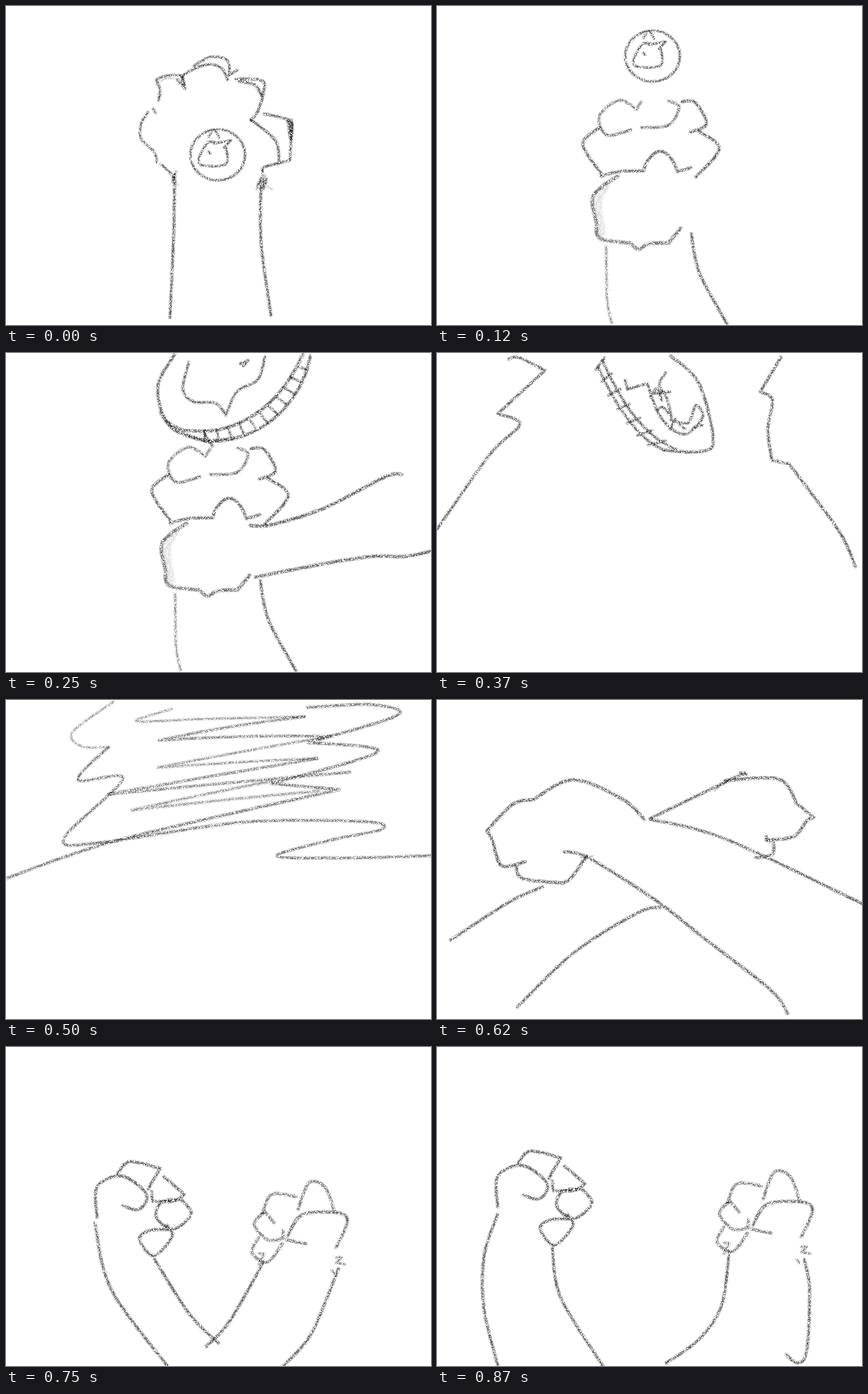
Write an HTML page with a canvas that moves like this. It is 560 px wide and 420 px high and loops after 1 s.

```html
<!DOCTYPE html>
<html lang="en">
<head>
<meta charset="utf-8">
<title>Pencil loop</title>
<style>
html, body { margin: 0; width: 560px; height: 420px; overflow: hidden; background: #fff; }
canvas { display: block; }
</style>
</head>
<body>
<canvas id="stage" width="560" height="420"></canvas>
<script>
const W = 560, H = 420, LOOP = 1000;
let ctx, grain, rnd;

function seeded(seed) {
  return () => {
    seed = (seed + 0x6D2B79F5) | 0;
    let v = Math.imul(seed ^ (seed >>> 15), 1 | seed);
    v = (v + Math.imul(v ^ (v >>> 7), 61 | v)) ^ v;
    return ((v ^ (v >>> 14)) >>> 0) / 4294967296;
  };
}

function newSheet(w, h) {
  const sheet = document.createElement('canvas');
  sheet.width = w;
  sheet.height = h;
  return sheet;
}

// Paper tooth: a tile of random ink strengths used as stroke paint.
function makeGrain(size) {
  const tile = newSheet(size, size), c = tile.getContext('2d'), r = seeded(5);
  c.fillStyle = '#262626';
  for (let i = 0; i < size * size; i++) {
    const v = r();
    if (v < .22) continue;
    c.globalAlpha = .1 + .75 * v;
    c.fillRect(i % size, Math.floor(i / size), 1, 1);
  }
  return tile;
}

// A light wide pass and a darker core.
function mark(path, width = 3.8, ink = 1) {
  for (const [grow, alpha] of [[1.3, .5], [-1, .8]]) {
    ctx.lineWidth = width + grow;
    ctx.globalAlpha = Math.min(1, alpha * ink);
    ctx.stroke(path);
  }
}

// "x,y x,y" is a smooth run, "/" a sharp corner, "|" lifts the pencil.
function line(text, width, ink) {
  for (const stroke of text.split('|')) {
    const path = new Path2D();
    let last = null;
    for (const run of stroke.split('/')) {
      const p = run.trim().split(/\s+/).map(q => q.split(',').map(Number));
      if (last) p.unshift(last);
      else path.moveTo(...p[0]);
      last = p[p.length - 1];
      for (let i = 0; i < p.length - 1; i++) {
        const b = p[i], c = p[i + 1], a = p[i - 1] || b, d = p[i + 2] || c;
        path.bezierCurveTo(
          b[0] + (c[0] - a[0]) / 6, b[1] + (c[1] - a[1]) / 6,
          c[0] - (d[0] - b[0]) / 6, c[1] - (d[1] - b[1]) / 6, ...c);
      }
    }
    mark(path, width, ink);
  }
}

// Back and forth between turning points, each stroke lifted by the bow.
function zigzag(text, bow, width, ink) {
  const p = text.split(' ').map(q => q.split(',').map(Number)), path = new Path2D();
  path.moveTo(...p[0]);
  for (let i = 1; i < p.length; i++)
    path.quadraticCurveTo((p[i - 1][0] + p[i][0]) / 2, (p[i - 1][1] + p[i][1]) / 2 - bow, ...p[i]);
  mark(path, width, ink);
}

function oval(x, y, rx, ry, width, ink) {
  const path = new Path2D();
  path.ellipse(x, y, rx, ry, 0, 0, Math.PI * 2);
  mark(path, width, ink);
}

function segment(a, b, width, ink) {
  const path = new Path2D();
  path.moveTo(...a);
  path.lineTo(...b);
  mark(path, width, ink);
}

function hatch(x, y, w, h, n) {
  for (let i = 0; i < n; i++) {
    const px = x + (rnd() - .5) * w, py = y + (rnd() - .5) * h;
    segment([px - 2, py + 5], [px + 2, py - 5], 3, .6);
  }
}

function cubic(c, u) {
  const v = 1 - u;
  return [0, 1].map(k => v * v * v * c[k] + 3 * v * v * u * c[2 + k] + 3 * v * u * u * c[4 + k] + u * u * u * c[6 + k]);
}

// Two curved rails with evenly spaced cross ticks.
function rails(outer, inner, ticks, over, width) {
  for (const c of [outer, inner]) mark(new Path2D(`M${c[0]} ${c[1]}C${c.slice(2)}`), width);
  for (let i = 0; i < ticks; i++) {
    const u = i / ticks, a = cubic(outer, u), b = cubic(inner, u);
    const dx = (b[0] - a[0]) * over, dy = (b[1] - a[1]) * over;
    segment([a[0] - dx, a[1] - dy], [b[0] + dx, b[1] + dy], 3.2, .9);
  }
}

function moved(dx, dy, draw) {
  ctx.save();
  ctx.translate(dx, dy);
  draw();
  ctx.restore();
}

function coin() {
  oval(279, 196, 36, 33.5, 3.2);
  line('267,172 274,163 281,173|275,181 296,177/287,187|276,180 266,180 254,201 260,210 290,208 290,187', 3);
  segment([267, 192], [269, 194], 3);
}

function raisedPaw() {
  line('222,224 221,300 216,410|336,240 336,310 349,407');
  line('187,140 178,155 178,175 195,192 199,206|204,208 221,224|194,135 197,141', 3.2);
  line('201,124 203,110 198,97/210,92 231,92 236,109/226,98', 3.2);
  line('234,106/234,91 265,77 284,82 292,97|247,79 270,67 292,72 294,91/305,84', 3.4);
  line('303,96 337,98 339,115 331,140 323,150|307,99 328,104 337,118', 3.6);
  line('323,150 355,177 360,206|340,142 370,149 377,156/374,203/341,212 338,219', 3.6);
  line('198,103 212,95 231,97|220,224 226,236|340,236 350,241', 3, .3);
  line('372,151 375,174|376,151 376,172', 4.5);
  hatch(336, 233, 12, 16, 9);
  hatch(221, 225, 4, 6, 3);
  coin();
}

function fist() {
  line('269,126 263,136/240,124 214,145 224,170 255,163|305,125 319,133 305,157 270,160', 3.6, .85);
  line('323,126 340,127 355,155 334,166|345,165 372,188 341,225', 3.8);
  line('214,160 192,182 216,220|216,224 240,218 272,217/278,203 293,191 308,200 317,218/334,213', 3.8);
  line('238,224 206,250 210,285 215,306 255,312/265,320 280,313 305,312/321,293', 4.6, .85);
  line('222,236 212,258 217,300', 11, .16);
  line('223,316 224,385 230,417', 3.4, .65);
  line('335,300 346,352 382,418');
}

function bigCoin() {
  rails([262, 116, 330, 120, 388, 72, 401, 4], [262, 103, 320, 100, 365, 60, 391, 2], 11, 0, 4);
  line('222,2 200,45 215,95 262,116');
  line('203,78 222,101 262,115 300,112', 4.2, .7);
  line('212,90 232,101 262,103|262,108 272,122');
  line('241,12 233,48 247,64 276,66 290,82/304,51 332,35 341,5', 3.4);
  line('309,14 319,10/313,17', 3.4);
}

function sideArm() {
  line('322,227 350,226 420,204 500,163 521,160|329,295 400,281 480,268 525,268 560,261', 4.2);
}

function shoulders() {
  line('94,8 108,6 142,23/80,80/109,94 70,133 0,232', 3.6);
  line('453,6 426,51/442,62 436,100 441,141/464,146/530,235 551,281');
  rails([212, 18, 228, 55, 262, 115, 300, 128], [218, 10, 238, 55, 268, 108, 315, 127], 7, .45, 3.4);
  line('300,128 345,130 364,115 345,40 308,4');
}

function mouth() {
  line('248,36 251,48/277,40/295,85 325,107 350,85 341,69 331,92 308,88', 3.4);
  line('301,26 293,42 303,60 309,85|281,58 290,47 296,62|287,53 307,51', 3.4);
  line('291,75 297,71 305,79|307,100 314,87|320,95 327,100|338,98 350,95', 3);
}

function scribble() {
  line('142,2 88,42 100,61 135,62', 3.2, .55);
  line('135,62 95,105 154,104 76,183 130,187 310,161 470,160 496,170 430,184 357,205 440,208 560,205', 3.6, .85);
  line('218,12 172,28 260,25 393,22', 3.2, .6);
  zigzag('393,22 202,53 427,48', 5, 3.6, .75);
  zigzag('427,48 200,89 410,77', 2, 3.4, .6);
  zigzag('410,77 135,124 453,95', 1, 3.8, .7);
  zigzag('350,107 166,145 412,120', 2, 3.6, .6);
  line('397,10 480,6 516,20 398,56/490,68 350,110/439,118/150,184 0,235', 3.8, .85);
}

function crossedArms() {
  line('273,157 245,131 180,105 127,131/100,137 66,172/73,185 85,218 116,213', 4.2);
  line('104,217 113,235 166,241/177,234 197,206', 4.2);
  line('168,200 200,208 290,265 350,312 440,382 462,413', 4);
  line('106,404 180,333 265,280 294,273|18,316 95,266 139,246', 3.8);
  line('281,157 380,183 560,268|281,156 405,96', 3.8);
  line('400,96 407,98|434,180 437,187', 4);
  line('380,106 450,104 474,136/497,155/488,158 470,180 434,184|443,185 442,203 420,208', 4);
  line('366,119 382,106|190,207 205,206', 3, .4);
}

function leftPaw() {
  line('80,210 80,170 113,156 145,180 135,200 114,195|107,153 123,137 163,146/147,173');
  line('168,157 195,180/180,189 153,189/152,176|192,188 204,206 180,226 158,210 165,190 190,187');
  line('172,221 179,235 155,261 136,240 148,228 177,226');
}

function rightPaw() {
  line('383,205 395,180 427,183|386,203 398,217|430,200 444,165 465,170 478,203', 4, .8);
  line('416,235 435,207 480,204 495,215 480,250|415,240 440,245', 4, .9);
  line('383,205 372,220 390,240 410,238/410,228|378,237 369,257 390,269 409,245', 4, .8);
  line('378,258 385,258/378,272|480,263 487,263/480,270/492,272|474,280 477,284', 3, .8);
}

function openArms() {
  line('80,220 62,275 62,345 80,419|152,265 163,330 218,419');
  line('385,270 375,340 345,385 302,416|484,280 491,320 487,400 475,416 460,405');
}

function swingArms() {
  line('117,232 139,320 212,419|196,280 242,352 280,390');
  line('339,284 294,362 264,394|438,292 402,378 366,419');
}

const scenes = [
  [0, raisedPaw],
  [120, () => { moved(5, -130, coin); fist(); }],
  [250, () => { bigCoin(); fist(); sideArm(); }],
  [370, () => { shoulders(); mouth(); }],
  [500, scribble],
  [620, crossedArms],
  [750, () => { moved(40, 14, leftPaw); moved(-45, 14, rightPaw); swingArms(); }],
  [870, () => { leftPaw(); rightPaw(); openArms(); }]
];

const tile = makeGrain(256);
const sheets = scenes.map(([, draw], i) => {
  const sheet = newSheet(W, H);
  ctx = sheet.getContext('2d');
  rnd = seeded(71 + i * 13);
  ctx.fillStyle = '#fff';
  ctx.fillRect(0, 0, W, H);
  ctx.strokeStyle = ctx.createPattern(tile, 'repeat');
  ctx.lineCap = ctx.lineJoin = 'round';
  draw();
  return sheet;
});

const stage = document.getElementById('stage').getContext('2d');
const start = performance.now();

function play() {
  const t = Math.max(0, performance.now() - start) % LOOP;
  let i = scenes.length - 1;
  while (scenes[i][0] > t) i--;
  stage.drawImage(sheets[i], 0, 0);
  requestAnimationFrame(play);
}
play();
</script>
</body>
</html>
```
